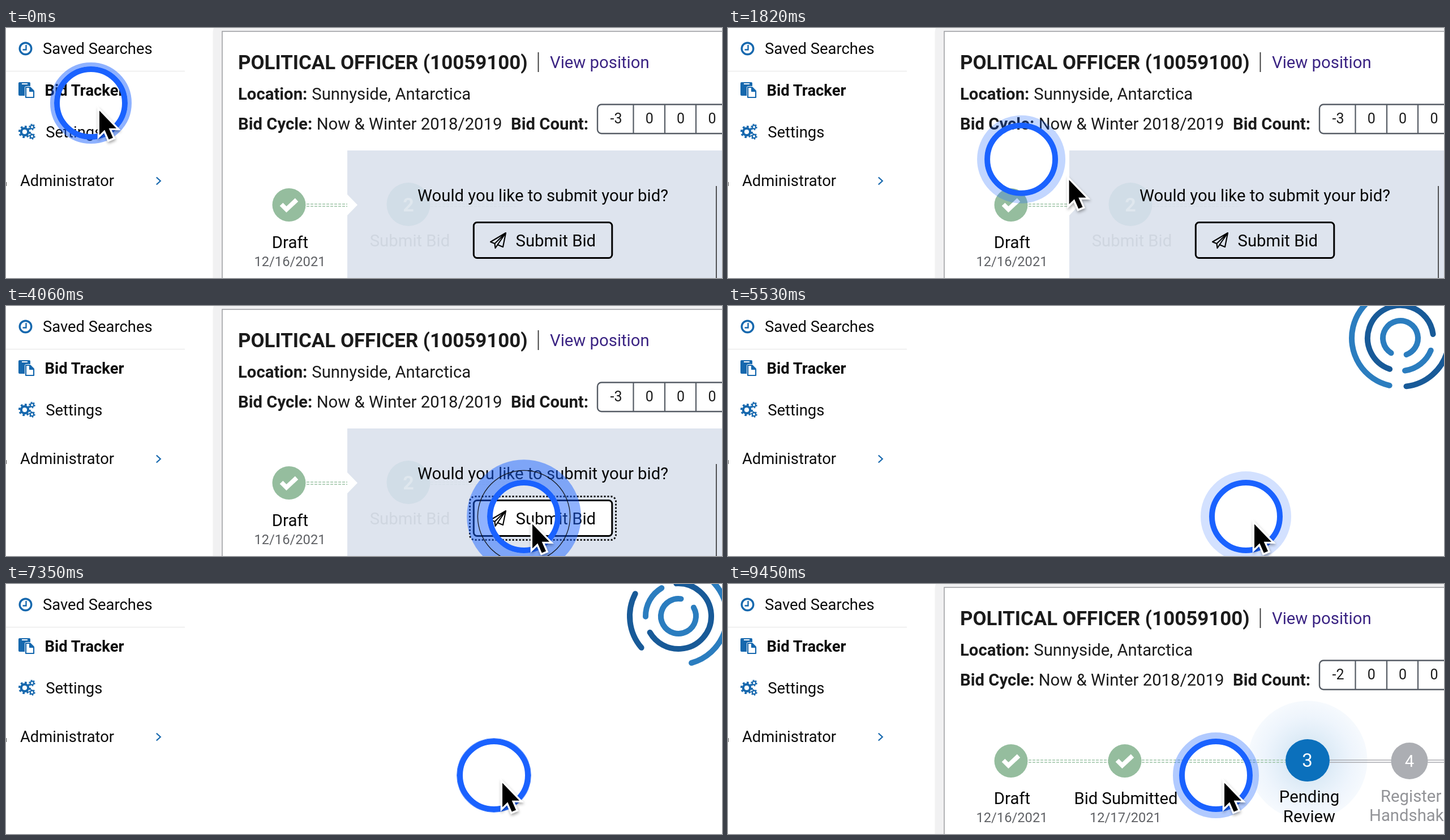
Animation, 1265 px wide and 443 px high, one loop 9520 ms. Source, as an HTML page:

```html
<!DOCTYPE html>
<html lang="en">
<head>
<meta charset="utf-8">
<title>Submitting a bid</title>
<style>
  html, body { margin: 0; width: 100%; height: 100%; overflow: hidden; background: #fff; }
  svg { display: block; width: 100%; height: 100%; }
  text { font-family: Roboto, Arial, sans-serif; font-size: 29.3px; fill: #1b1b1b; }
  .b { font-weight: 700; }
  .side text { font-size: 27.4px; fill: #0c0c0c; }
  .mid { text-anchor: middle; }
  .ink { fill: #080808; }
  .date { font-size: 23.7px; fill: #5f6165; text-anchor: middle; }
  .num { font-size: 25px; text-anchor: middle; }
  .light { fill: #929397; }
  .line { fill: none; }
</style>
</head>
<body>
<svg viewBox="0 0 1265 443" preserveAspectRatio="none">
  <defs>
    <g id="tick">
      <circle r="29.5" fill="#95bd9e"/>
      <path class="line" d="M-13.500 -1L-4.500 8L13.500 -9" stroke="#fff" stroke-width="8"/>
    </g>
    <radialGradient id="glow">
      <stop offset=".3" stop-color="#0b70bc" stop-opacity=".2"/>
      <stop offset=".75" stop-color="#3f8be0" stop-opacity=".11"/>
      <stop offset="1" stop-color="#3f8be0" stop-opacity=".06"/>
    </radialGradient>
    <filter id="shade" x="-50%" y="-50%" width="200%" height="200%">
      <feDropShadow dx="1" dy="3" stdDeviation="2.500" flood-opacity=".35"/>
    </filter>
  </defs>

  <rect width="1265" height="443" fill="#fff"/>

  <g class="side">
    <path d="M0 76.500H316" stroke="#ececec" stroke-width="1.500"/>
    <g class="line" stroke="#1668ae">
      <circle cx="34.500" cy="36.500" r="10.300" stroke-width="3.400"/>
      <path d="M35.500 30V38.500H29.500" stroke-width="2.400"/>
      <path d="M265.800 264.500L272.800 271L265.800 277.500" stroke-width="2.200"/>
    </g>
    <g fill="#1668ae">
      <path d="M24 96H41Q43 96 43 98V103H36Q33 103 33 106V120H24Q22 120 22 118V98Q22 96 24 96Z"/>
      <path d="M28 99H38" stroke="#fff" stroke-width="2"/>
      <path d="M35 105H42V112H49V123H35Z" fill="#fff" stroke="#1668ae" stroke-width="2.200" stroke-linejoin="round"/>
      <path d="M43 104L50 111H43Z"/>
    </g>
    <g id="gears" class="line" stroke="#1668ae"></g>
    <text x="65" y="46">Saved Searches</text>
    <text x="68.500" y="119.500" class="b">Bid Tracker</text>
    <text x="70.300" y="193.500">Settings</text>
    <text x="25" y="280">Administrator</text>
    <path d="M0 273V280" stroke="#555" stroke-width="2"/>
  </g>

  <g id="card">
    <rect x="365.500" y="-14" width="960" height="500" rx="22" fill="#f1f1f2"/>
    <rect x="382" y="6" width="940" height="480" fill="#fff" stroke="#9b9ca0" stroke-width="1.500"/>
    <text x="410" y="72.500" class="b" style="font-size:34.900px">POLITICAL OFFICER (10059100)</text>
    <path d="M940.500 43V78" stroke="#333" stroke-width="1.800"/>
    <text x="961" y="71" style="fill:#3b2483">View position</text>
    <text x="410" y="127" class="b">Location:</text>
    <text x="540.300" y="127">Sunnyside, Antarctica</text>
    <text x="410" y="180" class="b">Bid Cycle:</text>
    <text x="548.700" y="180">Now &amp; Winter 2018/2019</text>
    <text x="892" y="180" class="b">Bid Count:</text>
    <rect x="1045" y="135.500" width="260" height="51.500" rx="7" fill="#fff" stroke="#565c65" stroke-width="2.400"/>
    <path d="M1108.500 136V187M1164 136V187M1219 136V187" stroke="#565c65" stroke-width="2.200"/>
    <g class="ink">
      <text id="count" x="1078" y="169" class="num">-3</text>
      <text x="1136.700" y="169" class="num">0</text>
      <text x="1192" y="169" class="num">0</text>
      <text x="1247.500" y="169" class="num">0</text>
    </g>

    <use href="#tick" x="500" y="313.500"/>
    <text x="502" y="390" class="mid ink">Draft</text>
    <text x="501.500" y="422" class="date">12/16/2021</text>

    <g id="ask">
      <path d="M531 312H603M531 316H603" stroke="#9cc3a5" stroke-width="1.300" stroke-dasharray="5 2"/>
      <path d="M603 217H1265V443H603V332L621 313.500L603 295Z" fill="#dee4ee"/>
      <path d="M750 312H905M750 316H905" stroke="#d6dfe8" stroke-width="1.200" stroke-dasharray="5 2"/>
      <circle cx="711" cy="312.500" r="38.500" fill="#d1dde7"/>
      <text x="711" y="324.500" class="mid b" style="font-size:34px;fill:#dfe7ee">2</text>
      <text x="713.500" y="387" class="mid" style="fill:#cfd6e0">Submit Bid</text>
      <text x="727" y="307" class="ink">Would you like to submit your bid?</text>
      <path d="M1255 280V443" stroke="#222" stroke-width="1.500"/>
      <rect id="focus" class="line" x="819.500" y="337.500" width="258" height="77" rx="9" stroke="#111" stroke-width="3" stroke-dasharray="3 3"/>
      <rect id="button" x="826.300" y="344.500" width="244.500" height="63" rx="6" stroke="#000" stroke-width="3"/>
      <path class="line" d="M856 379L883 363L878 388L868.500 384L864.500 390L863.500 382ZM883 363L863.500 382M883 363L868.500 384" stroke="#000" stroke-width="2.100" stroke-linejoin="round"/>
      <text x="900.500" y="387" class="ink">Submit Bid</text>
    </g>

    <g id="done">
      <circle id="pulse" cx="1024" cy="312.500" fill="url(#glow)"/>
      <path d="M531 312H672M531 316H672M731 312H985M731 316H985" stroke="#9cc3a5" stroke-width="1.300" stroke-dasharray="5 2"/>
      <path d="M1063 312H1172M1063 316H1172M1236 312H1265M1236 316H1265" stroke="#a9abb0" stroke-width="1.300"/>
      <use href="#tick" x="701" y="313.500"/>
      <text x="703" y="390" class="mid ink">Bid Submitted</text>
      <text x="702" y="422" class="date">12/17/2021</text>
      <ellipse cx="1024" cy="312.500" rx="39" ry="37.500" fill="#0b70bc"/>
      <text x="1023.500" y="324" class="mid" style="font-size:33px;fill:#fff">3</text>
      <text x="1027" y="387" class="mid ink">Pending</text>
      <text x="1027" y="422" class="mid ink">Review</text>
      <circle cx="1204" cy="313.500" r="32.500" fill="#acaeb3"/>
      <text x="1204" y="323.500" class="mid" style="fill:#fff">4</text>
      <text x="1153" y="385.500" class="light">Register</text>
      <text x="1133" y="420" class="light">Handshake</text>
    </g>
  </g>

  <g id="loader" class="line" stroke-width="10" stroke-linecap="round"></g>

  <g id="spot" class="line">
    <circle id="halo" stroke="#1a62ff"/>
    <circle id="ripple" stroke="#111" stroke-width="1.300"/>
    <circle r="60" stroke="#1a62ff" stroke-width="10"/>
  </g>
  <path id="arrow" d="M0 0V43L9.300 34L16.700 51L24 48L16.700 31.200H30Z" fill="#000" stroke="#fff" stroke-width="6.500" paint-order="stroke" filter="url(#shade)"/>
</svg>

<script>
const LOOP = 9520, STEP = 70;
const CLICK = 3920, PULSE = 1400, RIPPLE = 560;
const LOAD = 4970, DONE = 8470, LAG = 58;

const $ = id => document.getElementById(id);
const clamp = v => Math.min(1, Math.max(0, v));
const ease = u => (1 - Math.cos(Math.PI * u)) / 2;
const easeOut = u => 1 - (1 - u) ** 2;
const show = (id, on) => $(id).setAttribute('display', on ? 'inline' : 'none');

function put(id, attrs) {
  for (const key in attrs) $(id).setAttribute(key, attrs[key]);
}

function addCircle(parent, attrs) {
  const c = document.createElementNS('http://www.w3.org/2000/svg', 'circle');
  for (const key in attrs) c.setAttribute(key, attrs[key]);
  $(parent).append(c);
  return c;
}

function addGear(cx, cy, r, teeth, w) {
  addCircle('gears', { cx, cy, r, 'stroke-width': w });
  addCircle('gears', {
    cx, cy, r: r + w * 0.75, 'stroke-width': w * 0.8,
    pathLength: teeth * 2, 'stroke-dasharray': '1 1'
  });
}
addGear(33, 184, 6.2, 8, 4.2);
addGear(46, 175.5, 3.1, 6, 2.3);
addGear(46, 192, 3.1, 6, 2.3);

// radius, start angle at 5530 ms, sweep, degrees per ms, colour
const LIGHT = '#2b7dbf', DARK = '#185a98';
const arcs = [
  [31, 122, 308, 0.1145, LIGHT],
  [58, 109, 244, 0.0864, DARK],
  [58, 22, 60, 0.0864, LIGHT],
  [86, 103, 207, 0.0684, LIGHT],
  [86, 15, 68, 0.0684, DARK]
].map(([r, start, sweep, rate, stroke]) => {
  const el = addCircle('loader', { r, stroke, pathLength: 360, 'stroke-dasharray': sweep + ' 360' });
  return { el, start, rate };
});

// start time, duration, from, to, bend of the path
const moves = [
  [1274, 1000, [150, 133], [915, 373], 1.2],
  [6373, 700, [915, 373], [862, 339], 0.643]
];

function pointer(t) {
  const [t0, dur, a, b, bend] = t < moves[1][0] ? moves[0] : moves[1];
  const f = ease(clamp((t - t0) / dur));
  return [a[0] + (b[0] - a[0]) * f, a[1] + (b[1] - a[1]) * f ** bend];
}

function drawSpot(t) {
  const [x, y] = pointer(t), [rx, ry] = pointer(t - LAG);
  const click = (t - CLICK) / RIPPLE;
  const clicking = click >= 0 && click < 1;
  const phase = (t < CLICK ? 0.35 + t / PULSE : (t - CLICK - RIPPLE) / PULSE) % 1;
  const edge = clicking ? 65 + 82 * easeOut(click) : 65 + 20 * phase;
  const alpha = clicking ? 0.65 * (1 - click) : 0.75 * (1 - phase);

  put('spot', { transform: `translate(${rx} ${ry})` });
  put('arrow', { transform: `translate(${x + 15} ${y + 13.5})` });
  put('halo', { r: (65 + edge) / 2, 'stroke-width': edge - 65, 'stroke-opacity': alpha });
  show('ripple', clicking);
  if (clicking) put('ripple', { r: 65 + 38 * easeOut(click), 'stroke-opacity': clamp(1.25 * (1 - click)) });

  const over = x > 826 && x < 1071 && y > 344 && y < 408;
  put('button', { fill: over ? '#fff' : '#dee4ee' });
}

function draw(time) {
  const t = Math.floor((time % LOOP) / STEP) * STEP;
  const loading = t >= LOAD && t < DONE, done = t >= DONE;
  show('card', !loading);
  show('loader', loading);
  show('ask', !done);
  show('done', done);
  show('focus', t >= CLICK);
  $('count').textContent = done ? '-2' : '-3';

  for (const { el, start, rate } of arcs) {
    el.setAttribute('transform', `translate(1188 57) rotate(${start + (t - 5530) * rate})`);
  }
  if (done) {
    const p = ((t - DONE) % PULSE) / PULSE;
    put('pulse', { r: 40 + 72 * easeOut(p), opacity: 1 - 0.3 * p });
  }
  drawSpot(t);
}

const began = performance.now();
function tick() {
  draw(performance.now() - began);
  requestAnimationFrame(tick);
}
tick();
</script>
</body>
</html>
```
